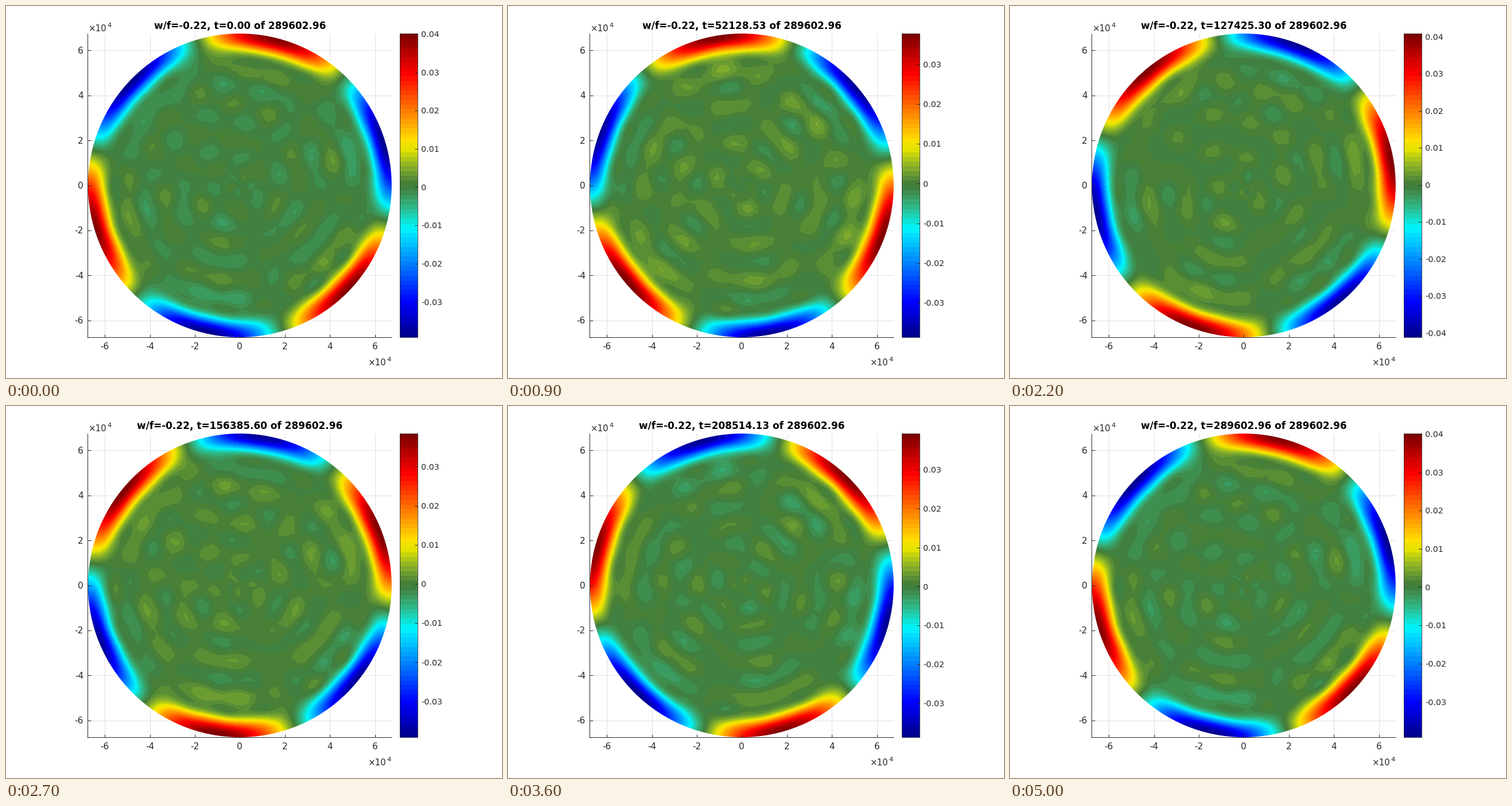
These frames come from a looping animation (864 px wide and 648 px high, 5100 ms). A matplotlib script:

```python
import numpy as np
import matplotlib.pyplot as plt
from matplotlib.animation import FuncAnimation
from matplotlib.patches import Circle
from matplotlib.tri import Triangulation

W, H, DPI = 864, 648, 100
FRAMES, STEP = 51, 100
PERIOD = 50
T_END = 289602.957
CX, CY, R = 407.3, 312.5, 264.5
UNIT = 39.2                          # pixels per 1e4 of axis
LEFT, RIGHT, TOP, BOTTOM = 142.4, 671.5, 48, 577
BAR_L, BAR_R = 686.4, 717.4
RING, RING_GAP = 198, 31             # outermost ripple and half its wavelength
PX = 72 / DPI
INK = "#262626"

plt.rcParams["font.family"] = "DejaVu Sans"
rng = np.random.default_rng(4)


def wave_phase(k):
    return 2 * np.pi * (k - 17) / PERIOD


def peak(k):
    """Highest value of the field, pulsing as the lobes go round."""
    p = wave_phase(k)
    return (0.0397 + 0.0017 * np.cos(2 * p) + 0.0008 * np.sin(2 * p)
            + 0.00045 * np.cos(3 * p))


def dark_centre_jet(n=64):
    """Jet with its middle dimmed to half brightness."""
    row = np.arange(1, n + 1)
    rgb = [np.clip(1.5 - np.abs(row - c) / 16, 0, 1) for c in (48, 32, 16)]
    dim = np.minimum(1, 0.5 + (np.abs(row - 32.5) - 0.5) / 18)
    return np.column_stack(rgb) * dim[:, None]


def disc_mesh():
    """Coarse rings inside, fine ones along the wall."""
    xs, ys = [CX], [CY]
    radii = np.concatenate([np.arange(12, 200, 12), np.linspace(203, R + 0.5, 15)])
    for i, r in enumerate(radii):
        n = int(2 * np.pi * r / 12) if r < 200 else 180
        wobble = 2 if r < 200 else 0
        a = 2 * np.pi * (np.arange(n) + 0.5 * (i % 2)) / n
        xs.extend(CX + r * np.cos(a) + rng.uniform(-wobble, wobble, n))
        ys.extend(CY + r * np.sin(a) + rng.uniform(-wobble, wobble, n))
    return np.array(xs), np.array(ys)


def mottle(x, y, waves=24, rms=0.0006):
    """Irregular blobs from random plane waves of the ripple's wavelength."""
    total = np.zeros_like(x)
    for a, shift in rng.uniform(0, 2 * np.pi, (waves, 2)):
        along = (x - CX) * np.cos(a) + (y - CY) * np.sin(a)
        total += np.cos(np.pi * along / RING_GAP + shift)
    return total * rms * np.sqrt(2 / waves)


X, Y = disc_mesh()
MESH = Triangulation(X, Y)
RAD = np.hypot(X - CX, Y - CY)
ANGLE = np.arctan2(CY - Y, X - CX)
WALL = np.exp(-(np.maximum(R - RAD, 0) / 28) ** 2.2)
INSIDE = 1 - WALL
RIPPLE = INSIDE * np.cos(np.pi * (RAD - RING) / RING_GAP) * (
    0.0017 + 0.001 * np.exp(-((RAD - RING) / 25) ** 2))
REAL, IMAG = INSIDE * mottle(X, Y), INSIDE * mottle(X, Y)
COLORS = dark_centre_jet()

fig = plt.figure(figsize=(W / DPI, H / DPI), dpi=DPI, facecolor="white")
ax = fig.add_axes([0, 0, 1, 1])
ax.axis("off")


def line(xs, ys, color=INK, width=1, z=5):
    return ax.plot(xs, ys, color=color, lw=width * PX, zorder=z,
                   solid_capstyle="butt")[0]


def label(x, y, s, px, **kw):
    kw = {"color": INK, "ha": "left", "va": "baseline", "zorder": 6, **kw}
    return ax.text(x, y, s, fontsize=px * PX, **kw)


def power(x, y):
    label(x, y, "×10", 15)
    label(x + 40.5, y - 7, "4", 11.5, ha="right")


# Axes: grid, ticks, labels
for v in range(-6, 7, 2):
    gx, gy = CX + v * UNIT, CY - v * UNIT
    line([gx, gx], [TOP, BOTTOM], "#dfdfdf", z=0)
    line([LEFT, RIGHT], [gy, gy], "#dfdfdf", z=0)
    line([gx, gx], [BOTTOM, BOTTOM - 5.5])
    line([LEFT, LEFT + 5.5], [gy, gy])
    label(gx, 598.5, str(v), 15.4, ha="center")
    label(135, gy + 5.5, str(v), 15.4, ha="right")
line([LEFT, LEFT], [TOP, BOTTOM + 0.5])
line([LEFT, RIGHT], [BOTTOM, BOTTOM])
power(143.5, 44)
power(630.5, 626)
ax.add_patch(Circle((CX, CY), R + 1, fill=False, ec="white", lw=2 * PX, zorder=3))

# Colour bar
ax.imshow(COLORS[::-1, None, :], extent=(BAR_L, BAR_R, BOTTOM, TOP),
          aspect="auto", interpolation="nearest", zorder=2)
line([BAR_L, BAR_R, BAR_R, BAR_L, BAR_L], [TOP, TOP, BOTTOM, BOTTOM, TOP], width=0.8)
bar_ticks = []
for i in range(-4, 5):
    v = i / 100
    bar_ticks.append((v, line([BAR_R - 5.5, BAR_R], [0, 0]),
                      label(723, 0, f"{v:g}", 14.2)))

title = label(CX, 39.7, "", 16.9, ha="center", color="black", weight="bold")

shown = []


def draw(k):
    while shown:
        shown.pop().remove()
    low, high = -peak(k + PERIOD / 2), peak(k)
    phase = wave_phase(k)
    sway = -1.26 + 1.26 * np.cos(2 * phase) - np.sin(2 * phase)
    centre = phase / 3 + np.radians(sway)

    z = ((high - low) / 2 * WALL + RIPPLE) * np.cos(3 * (ANGLE - centre))
    z += REAL * np.cos(phase) - IMAG * np.sin(phase)
    z = np.clip(z, low + 1e-6, high - 1e-6)
    shown.append(ax.tricontourf(MESH, z, levels=np.linspace(low, high, 65),
                                colors=COLORS, antialiased=False, zorder=2))
    ax.set_xlim(0, W)
    ax.set_ylim(H, 0)

    for v, tick, text in bar_ticks:
        y = BOTTOM - (v - low) / (high - low) * (BOTTOM - TOP)
        tick.set_ydata([y, y])
        text.set_y(y + 5.2)
        for part in (tick, text):
            part.set_visible(low <= v <= high)
    title.set_text(f"w/f=-0.22, t={k * T_END / PERIOD:.2f} of {T_END:.2f}")
    return []


anim = FuncAnimation(fig, draw, frames=FRAMES, interval=STEP,
                     init_func=lambda: draw(0), repeat=True, repeat_delay=0)
plt.show()
```
